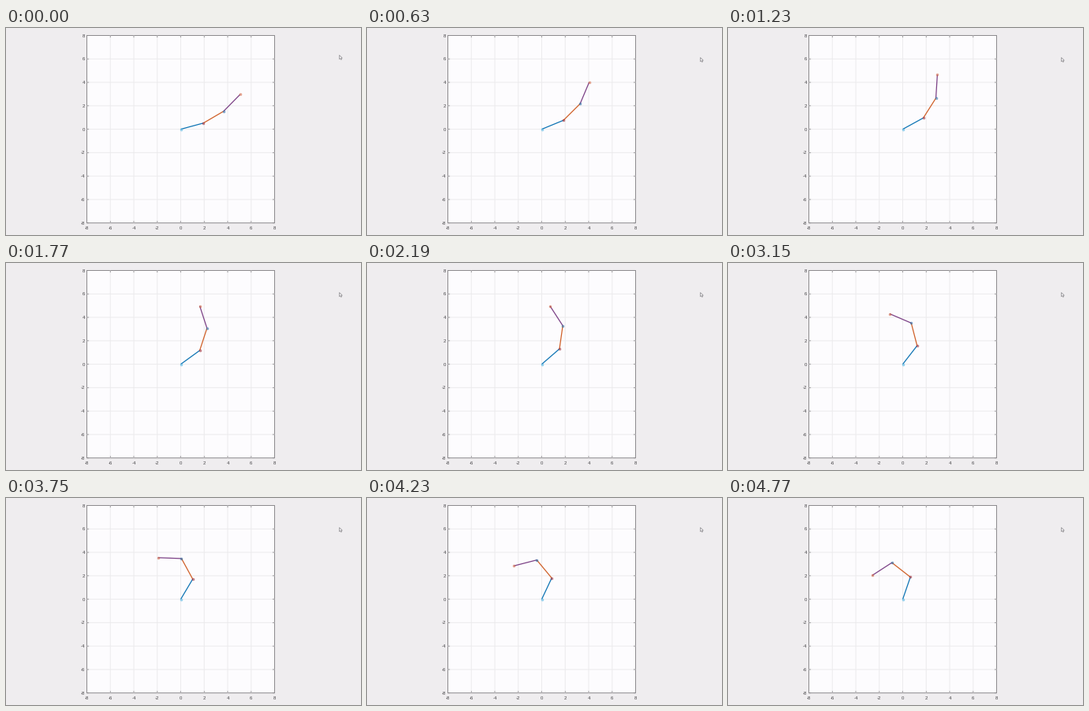
A matplotlib script for the animation above (4.8 s loop, 450x263 px).

```python
import numpy as np
import matplotlib.pyplot as plt
from matplotlib.animation import FuncAnimation
from matplotlib.colors import to_rgba
from matplotlib.patches import Polygon, Rectangle

W, H, DPI = 450, 263, 100
PX = 72 / DPI                  # one pixel in points
STEP, LOOP = 30, 4800          # ms
LEFT, RIGHT, TOP, BOTTOM = 102.5, 340.5, 9.5, 247.7
CX, CY = (LEFT + RIGHT) / 2, (TOP + BOTTOM) / 2
UNIT = (RIGHT - LEFT) / 16
LINK = 2 * UNIT

# Joint angle in degrees over time; every joint bends by the same angle.
TIMES = [0, 630, 1230, 1770, 2610, 3750, 4770]
ANGLES = [15.2, 22.4, 28.8, 36.0, 45.9, 59.3, 71.0]
SLOW_FROM = 2730               # from here the pose updates every 60 ms

FRAME, GRID = "#8c8a8d", "#ecebed"
LINK_COLORS = ["#0e74b4", "#d06028", "#7c4186"]
JOINT_COLORS = ["#43b0e2", "#98202f", "#1a68a8", "#d2603a"]
CURSOR = np.array([(0, 0), (0, 5.2), (1.3, 4.1), (2.2, 5.8),
                   (3.0, 5.4), (2.3, 3.8), (3.8, 3.7)])

plt.rcParams["font.family"] = "Liberation Sans"
fig = plt.figure(figsize=(W / DPI, H / DPI), dpi=DPI, facecolor="#efedef")
ax = fig.add_axes([0, 0, 1, 1])
ax.set_xlim(0, W)
ax.set_ylim(H, 0)
ax.axis("off")


def line(xs, ys, color, width, **kw):
    return ax.plot(xs, ys, color=color, lw=width * PX, snap=False,
                   solid_capstyle="butt", **kw)[0]


def draw_axes():
    ax.add_patch(Rectangle((LEFT, TOP), RIGHT - LEFT, BOTTOM - TOP,
                           fc="#fdfcfe", ec="none", snap=False))
    tick = 2.6
    style = dict(fontsize=6 * PX, color="#48474a", va="center_baseline")
    for v in range(-8, 9, 2):
        x, y = CX + v * UNIT, CY - v * (BOTTOM - TOP) / 16
        if abs(v) < 8:
            line([x, x], [TOP, BOTTOM], GRID, 1)
            line([LEFT, RIGHT], [y, y], GRID, 1)
        for edge, d in ((TOP, tick), (BOTTOM, -tick)):
            line([x, x], [edge, edge + d], FRAME, 0.8)
        for edge, d in ((LEFT, tick), (RIGHT, -tick)):
            line([edge, edge + d], [y, y], FRAME, 0.8)
        ax.text(x, 254, str(v), ha="center", **style)
        ax.text(99.8, y, str(v), ha="right", **style)
    ax.add_patch(Rectangle((LEFT, TOP), RIGHT - LEFT, BOTTOM - TOP,
                           fc="none", ec=FRAME, lw=PX, snap=False))


draw_axes()
links = [line([], [], c, 1.25, zorder=5) for c in LINK_COLORS]
joints = [line([], [], c, 1, zorder=6, marker="o", ms=2.7 * PX,
               mfc=to_rgba(c, 0.45), mew=0.9 * PX) for c in JOINT_COLORS]
cursor = Polygon(CURSOR, closed=True, fc="#f6f5f7", ec="#8a898c",
                 lw=0.7 * PX, zorder=7, snap=False)
ax.add_patch(cursor)


def arm(t):
    if t > SLOW_FROM:
        t -= (t - SLOW_FROM) % 60
    angle = np.radians(np.interp(t, TIMES, ANGLES))
    turns = angle * np.arange(1, 4)
    xs = CX + LINK * np.append(0, np.cumsum(np.cos(turns)))
    ys = CY - LINK * np.append(0, np.cumsum(np.sin(turns)))
    return xs, ys


def update(i):
    t = i * STEP
    xs, ys = arm(t)
    for k, link in enumerate(links):
        link.set_data(xs[k:k + 2], ys[k:k + 2])
    for joint, x, y in zip(joints, xs, ys):
        joint.set_data([x], [y])
    cursor.set_xy(CURSOR + (422.5, np.interp(t, [0, 240], [34.5, 37.5])))
    return [*links, *joints, cursor]


anim = FuncAnimation(fig, update, frames=LOOP // STEP, interval=STEP,
                     repeat=True, repeat_delay=0, blit=False)
plt.show()
```
